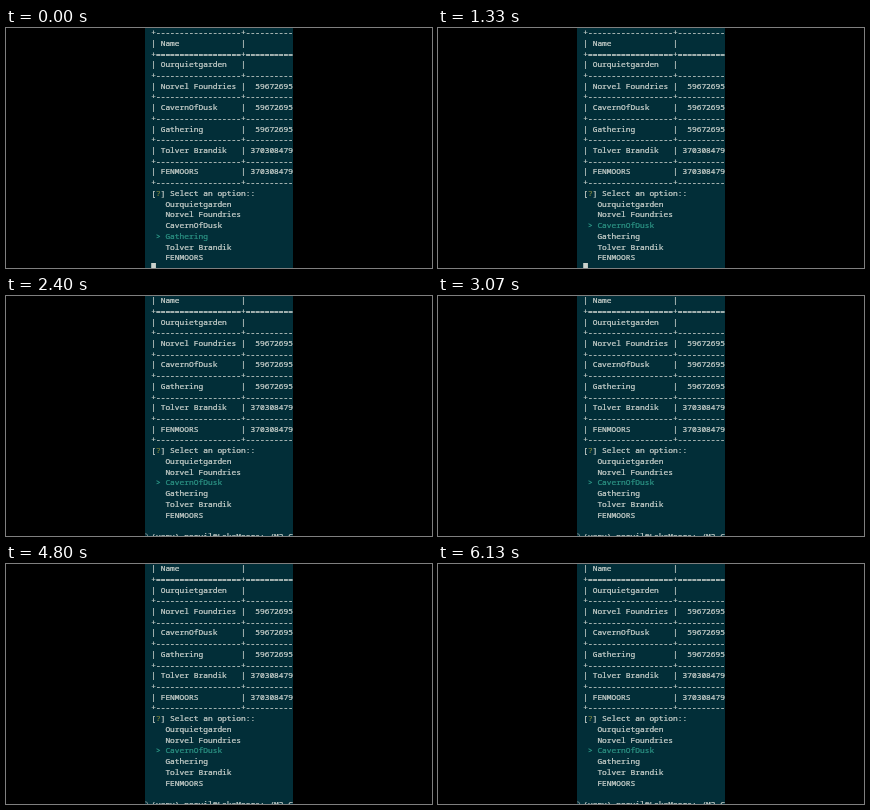
An HTML page with a canvas that plays this animation: 426 by 240 pixels, repeating every 6.19 s.

```html
<!DOCTYPE html>
<html lang="en">
<head>
<meta charset="utf-8">
<title>Terminal menu</title>
<style>
  html, body { margin: 0; width: 100%; height: 100%; overflow: hidden; background: #000; }
  canvas { display: block; }
</style>
</head>
<body>
<canvas width="426" height="240"></canvas>
<script>
const ctx = document.querySelector('canvas').getContext('2d');
const LOOP = 6190, SCROLL_AT = 2270;
const COL = 4.727, ROW = 10.72, LEFT = 145.2, BASE = 7.1;
const INK = '#cbd2cd', PICK = '#2c9384', MARK = '#77803f';

const names = ['Ourquietgarden', 'Norvel Foundries', 'CavernOfDusk',
               'Gathering', 'Tolver Brandik', 'FENMOORS'];
const ids = ['', ' 59672695', ' 59672695', ' 59672695', '370308479', '370308479'];
// [start time, highlighted option]
const picks = [[0, 3], [270, 2], [530, 1], [1330, 2]];

const rule = c => '+' + c.repeat(18) + '+' + c.repeat(12);
const cells = (name, id) => `| ${name.padEnd(16)} | ${id}`;
const table = [rule('-'), cells('Name', ''), rule('=')];
names.forEach((name, i) => table.push(cells(name, ids[i]), rule('-')));
const MENU = table.length;

function write(text, col, row, color = INK) {
  ctx.save();
  ctx.translate(LEFT + col * COL, BASE + row * ROW);
  // A large font scaled down keeps fractional letter widths.
  ctx.scale(0.1, 0.1);
  ctx.font = '78.8px "Noto Sans Mono", "DejaVu Sans Mono", monospace';
  ctx.fillStyle = ctx.strokeStyle = color;
  ctx.lineWidth = 2.5;
  ctx.fillText(text, 0, 0);
  ctx.strokeText(text, 0, 0);
  ctx.restore();
}

function draw(t) {
  const done = t >= SCROLL_AT;
  const picked = picks.filter(p => p[0] <= t).pop()[1];

  ctx.fillStyle = '#000';
  ctx.fillRect(0, 0, 426, 240);
  ctx.save();
  ctx.beginPath();
  ctx.rect(139, 0, 148, 240);
  ctx.clip();
  ctx.fillStyle = '#022e38';
  ctx.fillRect(139, 0, 148, 240);

  if (done) ctx.translate(0, -ROW);
  table.forEach((line, i) => write(line, 0, i));
  write('[ ] Select an option::', 0, MENU);
  write('?', 1, MENU, MARK);
  names.forEach((name, i) => {
    const row = MENU + 1 + i, on = i === picked;
    if (on) write('>', 1, row, PICK);
    write(name, 3, row, on ? PICK : INK);
  });

  if (done) {
    write('(venv) norvil@LakeMoors: /M2 C', 0, MENU + 8);
    ctx.strokeStyle = '#6f8588';
    ctx.beginPath();
    ctx.arc(139.5, 240 + ROW, 2.2, 0, Math.PI * 2);
    ctx.stroke();
  } else {
    ctx.fillStyle = INK;
    ctx.fillRect(LEFT, 235, COL, 5);
  }
  ctx.restore();
}

const start = performance.now();
function tick() {
  draw((performance.now() - start) % LOOP);
  requestAnimationFrame(tick);
}
tick();
</script>
</body>
</html>
```
